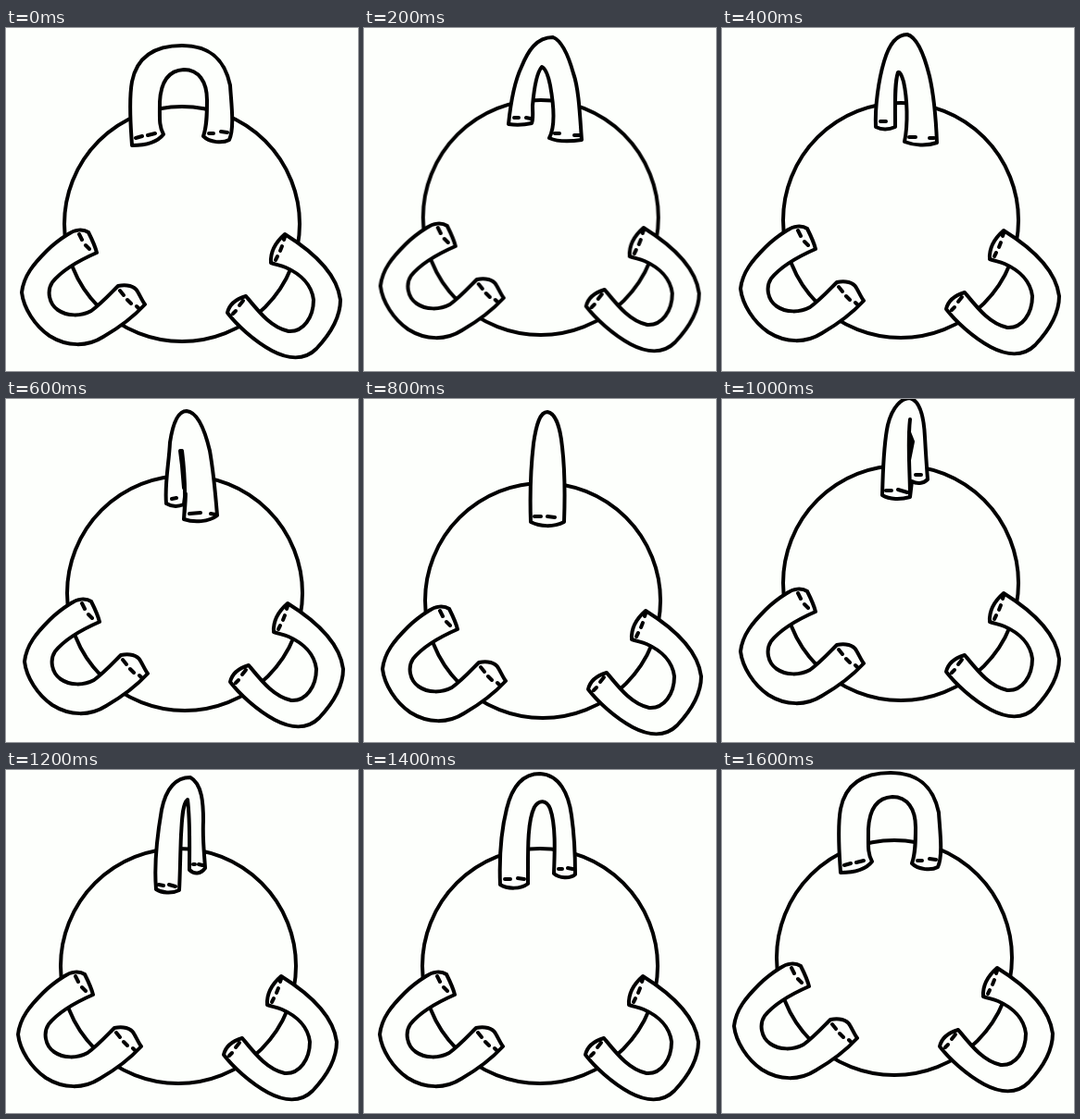
Write an HTML page that moves like this. It is 380 px wide and 371 px high and loops after 1.8 s.

```html
<!DOCTYPE html>
<html lang="en">
<head>
<meta charset="utf-8">
<title>Sphere with three handles</title>
<style>
html, body { margin: 0; width: 100%; height: 100%; overflow: hidden; background: #fdfffc; }
svg { display: block; width: 380px; height: 371px; }
svg * { stroke-linecap: round; stroke-linejoin: round; }
circle, path { fill: #fdfffc; stroke: #000; stroke-width: 4; }
.ink { fill: #000; }

/* nine drawings, 200 ms each */
.body { animation: jump 1.8s step-end infinite; }
.pose { visibility: hidden; animation: show 1.8s step-end infinite; animation-delay: calc((var(--n) - 9) * .2s); }

@keyframes show {
  0% { visibility: visible; }
  11.1111%, 100% { visibility: hidden; }
}
@keyframes jump {
  0%, 100% { transform: translate(0, 0); }
  11.1111% { transform: translate(.7px, -7px); }
  22.2222% { transform: translate(3px, -4px); }
  33.3333% { transform: translate(3px, -2px); }
  44.4444% { transform: translate(3px, 6px); }
  55.5556% { transform: translate(3px, -13px); }
  66.6667% { transform: translate(-4px, 0); }
  77.7778% { transform: translate(0, 0); }
  88.8889% { transform: translate(-4px, -9px); }
}
</style>
</head>
<body>
<svg viewBox="0 0 380 371">
  <defs>
    <path id="wide" d="M136 127C135 110 132 80 136 58C141 33 158 19 190 19C224 19 237 38 242 62C243 80 247 108 241 121C234 125 220 124 213 117C217 106 217 92 217 78C217 58 208 45 192 45C174 46 167 60 166 80C166 98 165 106 170 115C163 124 150 127 136 127Z
      M140 119L147 117M153 116L161 114M219 114L224 114M232 112L239 113"/>
  </defs>

  <g class="body">
    <circle cx="190" cy="212" r="127"/>
    <path d="M67 223C74 218 83 217 89 221C93 229 96 235 98 243C82 250 62 260 50 275C44 284 46 298 56 305C66 312 81 312 92 306C103 298 112 288 121 279C130 277 139 279 142 285C145 290 147 295 150 299C138 312 124 323 105 334C88 345 66 345 47 333C31 322 19 303 17 286C19 268 30 255 44 241C52 233 59 228 67 223Z
      M79 223L82 229M86 235L90 239M123 284L127 289M131 294L135 298M141 301L143 303"/>
    <path d="M301 223C293 230 285 240 286 254C292 256 297 257 302 259C318 266 330 278 332 294C332 313 321 329 305 328C286 324 273 307 259 290C249 293 241 299 239 308C249 321 267 338 287 349C304 358 322 360 335 347C351 330 361 312 361 294C358 270 338 246 301 223Z
      M301 226L300 229M298 236L296 241M293 247L291 251M256 295L252 300M248 306L245 309"/>
  </g>

  <use class="pose" style="--n:0" href="#wide"/>

  <g class="pose" style="--n:1">
    <path d="M156 104C158 84 161 61 170 42C177 25 186 10 204 10C214 14 221 31 226 49C232 66 233 94 235 121C222 123 209 123 200 119C207 106 205 84 201 62C199 52 196 44 192 42C185 50 183 72 182 84C182 92 183 98 181 103C172 105 164 105 156 104Z
      M162 97L167 97M175 97L180 98M206 114L211 114M227 116L232 116"/>
  </g>

  <g class="pose" style="--n:2">
    <path d="M166 107C165 85 169 56 175 36C180 19 187 7 200 7C211 10 219 32 224 52C229 74 231 98 232 124C221 128 207 127 197 123C201 104 200 76 196 58C194 51 192 47 190 48C186 60 187 82 187 107C180 110 172 110 166 107Z
      M171 101L177 101M202 118L209 118M224 119L229 119"/>
  </g>

  <g class="pose" style="--n:3">
    <path d="M173 113C171 92 176 69 177 47C180 27 185 13 195 13C207 14 215 35 220 56C224 79 226 101 228 126C219 133 203 134 192 130C194 110 195 88 192 114C185 117 178 116 173 113Z
      M192 130C194 106 193 80 190 56M179 108L184 107M198 124L210 123M221 124L226 125"/>
    <path class="ink" d="M188 56L191 72L192 96L190 72Z"/>
  </g>

  <g class="pose" style="--n:4">
    <path d="M180 133C179 104 180 74 183 48C186 27 190 14 198 14C207 15 212 32 214 52C217 78 217 106 216 133C204 139 190 138 180 133Z
      M184 127L191 127M198 127L206 128"/>
  </g>

  <g class="pose" style="--n:5">
    <path d="M173 104C174 76 174 51 179 28C184 8 194-1 203-1C214 2 218 20 219 41C220 59 221 74 222 87C217 92 210 92 205 89L203 106C193 109 181 109 173 104Z
      M203 105C203 77 200 49 203 22M177 99L183 99M190 98L200 101M209 82L215 82"/>
    <path class="ink" d="M202 36L206 46L202 66Z"/>
  </g>

  <g class="pose" style="--n:6">
    <path d="M162 129C160 105 163 72 168 43C173 19 183 8 199 8C212 15 213 37 213 55C212 74 214 90 215 106C210 113 203 113 198 108C198 82 199 55 196 32C190 37 190 56 189 70C188 93 188 112 187 130C179 134 168 133 162 129Z
      M165 124L170 125M176 124L183 126M202 102L204 102M208 102L212 103"/>
  </g>

  <g class="pose" style="--n:7">
    <path d="M147 124C146 98 148 66 154 42C160 17 172 4 190 4C211 5 221 26 224 49C227 70 228 93 228 113C222 118 211 117 205 112C206 87 207 59 201 42C197 32 189 32 184 40C176 56 177 88 177 123C169 129 155 129 147 124Z
      M152 118L158 118M166 117L173 118M210 107L214 107M220 106L225 107"/>
  </g>

  <g class="pose" style="--n:8"><use href="#wide" x="-8" y="-16"/></g>
</svg>
</body>
</html>
```
